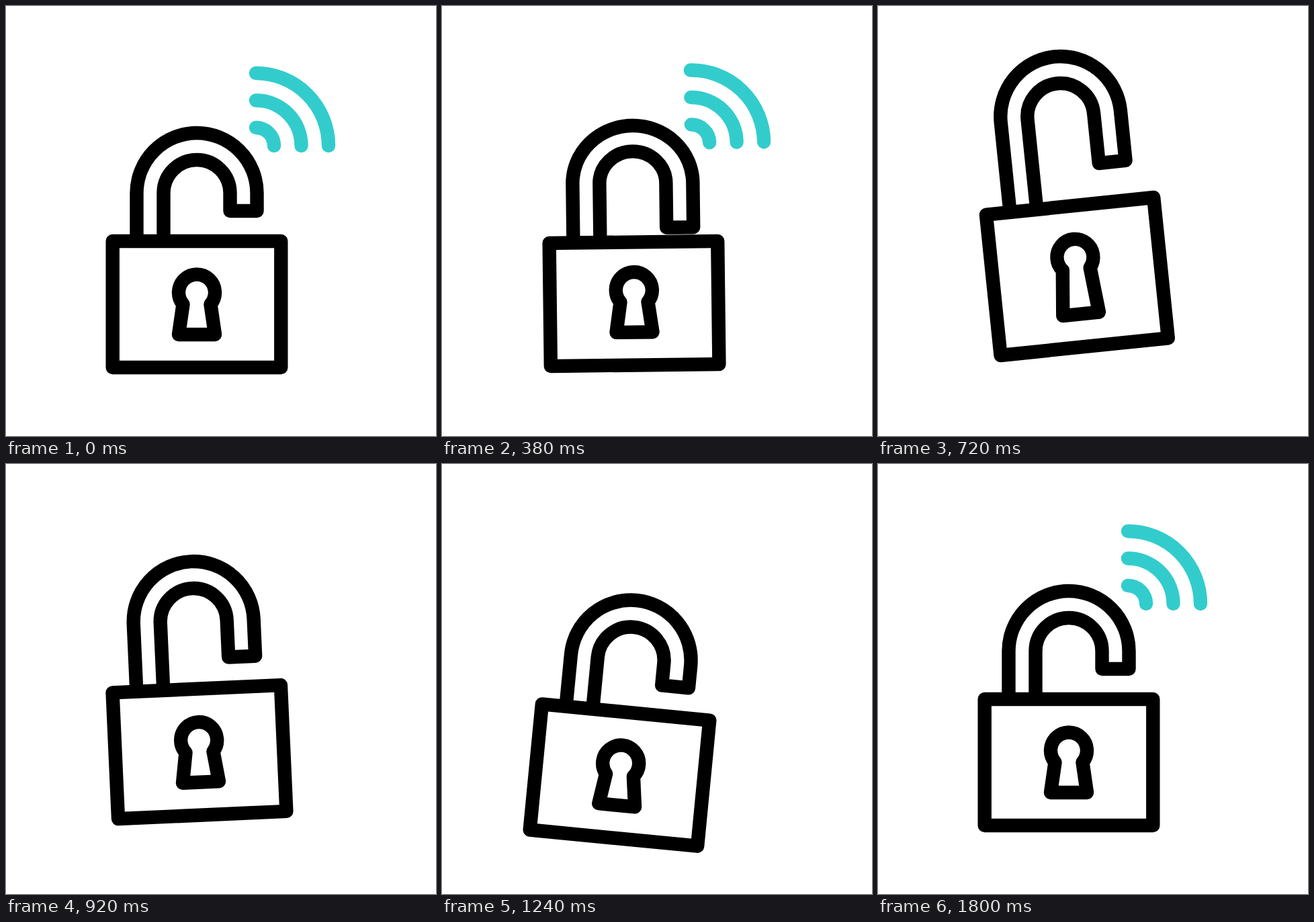
Write an HTML page that moves like this. It is 640x640 px and loops after 1900 ms.

```html
<!DOCTYPE html>
<html lang="en">
<head>
<meta charset="utf-8">
<title>Smart lock</title>
<style>
  html, body { margin: 0; width: 100%; height: 100%; overflow: hidden; background: #fff; }
  svg { display: block; width: 100%; height: 100%; }
  path { fill: none; stroke: #000; stroke-width: 20.4; stroke-linejoin: round; }
  .wave { stroke: #3cc; stroke-linecap: round; }
</style>
</head>
<body>
<svg viewBox="0 0 640 640">
  <g id="lock">
    <path id="shackle"/>
    <path id="body"/>
    <path id="keyhole"/>
    <path class="wave"/>
    <path class="wave"/>
    <path class="wave"/>
  </g>
</svg>
<script>
const LOOP = 1900, STEP = 20;
const CX = 284, PIVOT = 278, BOTTOM = 538;
const OUTER = 89.5, INNER = 49.5;

const byId = id => document.getElementById(id);
const lock = byId('lock'), shackle = byId('shackle'), body = byId('body'), keyhole = byId('keyhole');
const waves = document.querySelectorAll('.wave');

function draw(t) {
  // Smooth progress from 0 to 1 between two times.
  const ease = (from, to) => {
    const p = Math.min(1, Math.max(0, (t - from) / (to - from)));
    return p * p * (3 - 2 * p);
  };

  // The whole lock hops up, swings down past its rest, then settles.
  const hop = ease(304, 664), swing = ease(680, 1400);
  const angle = -6 * hop + 13.2 * swing - 7.2 * ease(1330, 1570);
  const dx = -3.5 * (ease(380, 660) - ease(1560, 1760));
  const dy = -30 * hop + 57 * swing - 27 * ease(1340, 1660);
  lock.setAttribute('transform', `translate(${dx} ${dy}) rotate(${angle} ${CX} ${PIVOT})`);

  // The body squashes, then stretches during the hop.
  const stretch = -7.5 * ease(240, 320) + 33 * ease(320, 670) - 25.5 * ease(670, 900);
  const tall = Math.max(0, stretch), squash = 1 + Math.min(0, stretch) * .0085;
  const top = 350 - stretch;
  body.setAttribute('d', `M158.7 ${top}H409.3V${BOTTOM}H158.7Z`);

  const neck = 444 - tall;
  keyhole.setAttribute('d', `M263.5 ${neck}A27 27 0 1 1 304.5 ${neck}L311 489H257Z`);

  // The shackle closes, pops open, then its free leg shortens again.
  const shrink = 40 * ease(640, 1440);
  const leg = 26.5 + 40 * ease(110, 290) + .43 * tall - shrink;
  const arc = 278.5 - 97 * ease(310, 640) + 57 * ease(650, 900) + shrink;
  shackle.setAttribute('d',
    `M${CX - OUTER} ${top}V${arc}A${OUTER} ${OUTER * squash} 0 0 1 ${CX + OUTER} ${arc}` +
    `v${leg}H${CX + INNER}V${arc}` +
    `A${INNER} ${INNER * squash} 0 0 0 ${CX - INNER} ${arc}V${top}`);

  // Waves fly off from the outermost in, and return from the innermost out.
  const leaving = t < 1000, away = leaving ? ease(380, 660) : 0;
  const size = leaving ? 1 + .16 * away : .6 + .4 * ease(1380, 1700);
  const x = 372 + 40 * away, y = 208 - 40 * away;
  waves.forEach((wave, i) => {
    const r = (27 + 40.5 * i) * size;
    const out = 590 - 100 * i, back = 1390 + 100 * i;
    wave.setAttribute('d', `M${x} ${y - r}A${r} ${r} 0 0 1 ${x + r} ${y}`);
    wave.setAttribute('opacity', 1 - ease(out, out + 100) + ease(back, back + 100));
  });
}

const start = performance.now();
function tick() {
  const t = Math.max(0, performance.now() - start) % LOOP;
  draw(Math.floor(t / STEP) * STEP);
  requestAnimationFrame(tick);
}
tick();
</script>
</body>
</html>
```
